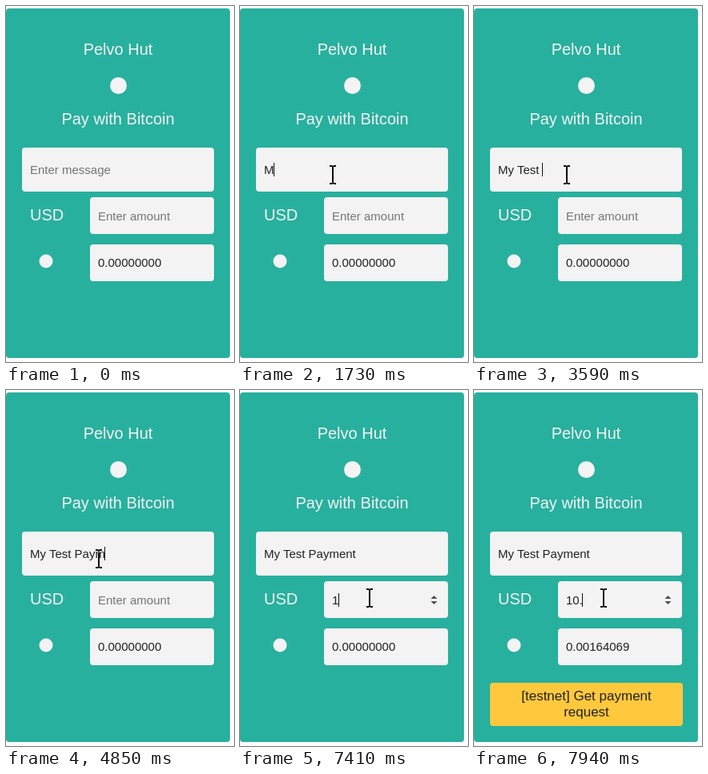
Recreate the animation shown at these times as an HTML page. Size 285x445 px, loop 8000 ms.

```html
<!DOCTYPE html>
<html lang="en">
<head>
<meta charset="utf-8">
<title>Payment form</title>
<style>
  html, body { margin: 0; width: 100%; height: 100%; overflow: hidden; background: #fff; }
  svg { display: block; font: 15px "Liberation Sans", Arial, sans-serif; fill: #222; }
  .card { fill: #28b09e; }
  .field { fill: #f3f3f3; }
  .light { fill: #f3f3f3; font-size: 20px; }
  .mid { text-anchor: middle; }
  .hint { fill: #757575; }
  #button { font-size: 17px; }
  #beam { fill: #fff; mix-blend-mode: difference; }
</style>
</head>
<body>
<svg width="285" height="445" viewBox="0 0 285 445">
  <rect width="285" height="445" fill="#fff"/>
  <rect class="card" y="3" width="280" height="437" rx="4"/>
  <g class="light">
    <text class="mid" x="140" y="61">Pelvo Hut</text>
    <circle cx="140.5" cy="99.5" r="10.5"/>
    <text class="mid" x="140" y="148">Pay with Bitcoin</text>
    <text x="30" y="268">USD</text>
    <circle cx="50" cy="319" r="8.5"/>
  </g>
  <g class="field">
    <rect x="20" y="177" width="240" height="55" rx="4"/>
    <rect x="105" y="239" width="155" height="46" rx="4"/>
    <rect x="105" y="298" width="155" height="46" rx="4"/>
  </g>
  <text id="message" x="30" y="210" xml:space="preserve"></text>
  <text id="amount" x="115" y="268"></text>
  <text id="coins" x="115" y="326"></text>
  <path id="spinner" d="M238.5 261l4-4 4 4zM238.5 264l4 4 4-4z" fill="#505050"/>
  <g id="button">
    <rect x="20" y="366" width="241" height="54" rx="4" fill="#ffc83d"/>
    <text class="mid" x="140.5" y="388">[testnet] Get payment</text>
    <text class="mid" x="140.5" y="408">request</text>
  </g>
  <rect id="caret" width="1" height="17" fill="#111"/>
  <path id="beam" d="M-4-12h3l1 1 1-1h3v2h-3v20h3v2h-3l-1-1-1 1h-3v-2h3v-20h-3z"/>
  <path id="arrow" d="M.5.5v16l3.7-3.5 2.5 5.6 2.4-1-2.4-5.5h5z" fill="#fff" stroke="#000"/>
</svg>
<script>
const LOOP = 8000;
const $ = id => document.getElementById(id);
const [message, amount, coins, spinner, button, caret, beam, arrow] =
  ["message", "amount", "coins", "spinner", "button", "caret", "beam", "arrow"].map($);

const messageKeys = [1730, 2040, 2290, 2940, 3110, 3280, 3510, 3590,
                     4220, 4370, 4620, 4850, 5000, 5100, 5330];
const amountKeys = [7410, 7540, 7940];
const caretHidden = [[0, 740], [1310, 1730], [2840, 2940], [4140, 4220], [5830, 6380], [7010, 7410]];
// Second pointer move: time, x, y
const secondMove = [[6080, 121, 213], [6150, 145, 227], [6230, 164, 248],
                    [6300, 163, 256], [6380, 162, 259], [6460, 162, 260]];

const typed = (text, keys, t) => text.slice(0, keys.filter(k => k <= t).length);
const show = (el, on) => el.setAttribute("visibility", on ? "visible" : "hidden");
const inside = ([x, y], left, top, right, bottom) => x >= left && x < right && y >= top && y < bottom;

function pointerAt(t) {
  const held = secondMove.filter(k => k[0] <= t).pop();
  if (held) return held.slice(1);
  const p = Math.min(1, Math.max(0, Math.floor((t - 70) / 74.4) / 8));
  const rest = 1 - p * p * (3 - 2 * p);
  return [Math.round(116 + 49 * rest), Math.round(211 + 159 * rest)];
}

function setField(el, value, hint) {
  el.textContent = value || hint;
  el.classList.toggle("hint", !value);
}

function render(t) {
  const note = typed("My Test Payment", messageKeys, t);
  const usd = typed("10.", amountKeys, t);
  setField(message, note, "Enter message");
  setField(amount, usd, "Enter amount");
  coins.textContent = t < 7540 ? "0.00000000" : t < 7710 ? "0.00016407" : "0.00164069";
  show(button, t >= 7540);

  const onAmount = t >= 6460;
  const [field, value, left, top] = onAmount ? [amount, usd, 115, 254] : [message, note, 30, 196];
  caret.setAttribute("x", Math.floor(left + (value ? field.getComputedTextLength() : 0)));
  caret.setAttribute("y", top);
  show(caret, !caretHidden.some(([from, to]) => t >= from && t < to));

  const pos = pointerAt(t);
  const overAmount = inside(pos, 105, 239, 260, 285);
  const overField = overAmount || inside(pos, 20, 177, 260, 232) || inside(pos, 105, 298, 260, 344);
  for (const el of [beam, arrow]) el.setAttribute("transform", `translate(${pos})`);
  show(beam, t >= 70 && overField);
  show(arrow, t >= 70 && !overField);
  show(spinner, t >= 70 && overAmount);
}

const start = performance.now();
function tick() {
  render((performance.now() - start) % LOOP);
  requestAnimationFrame(tick);
}
tick();
</script>
</body>
</html>
```
